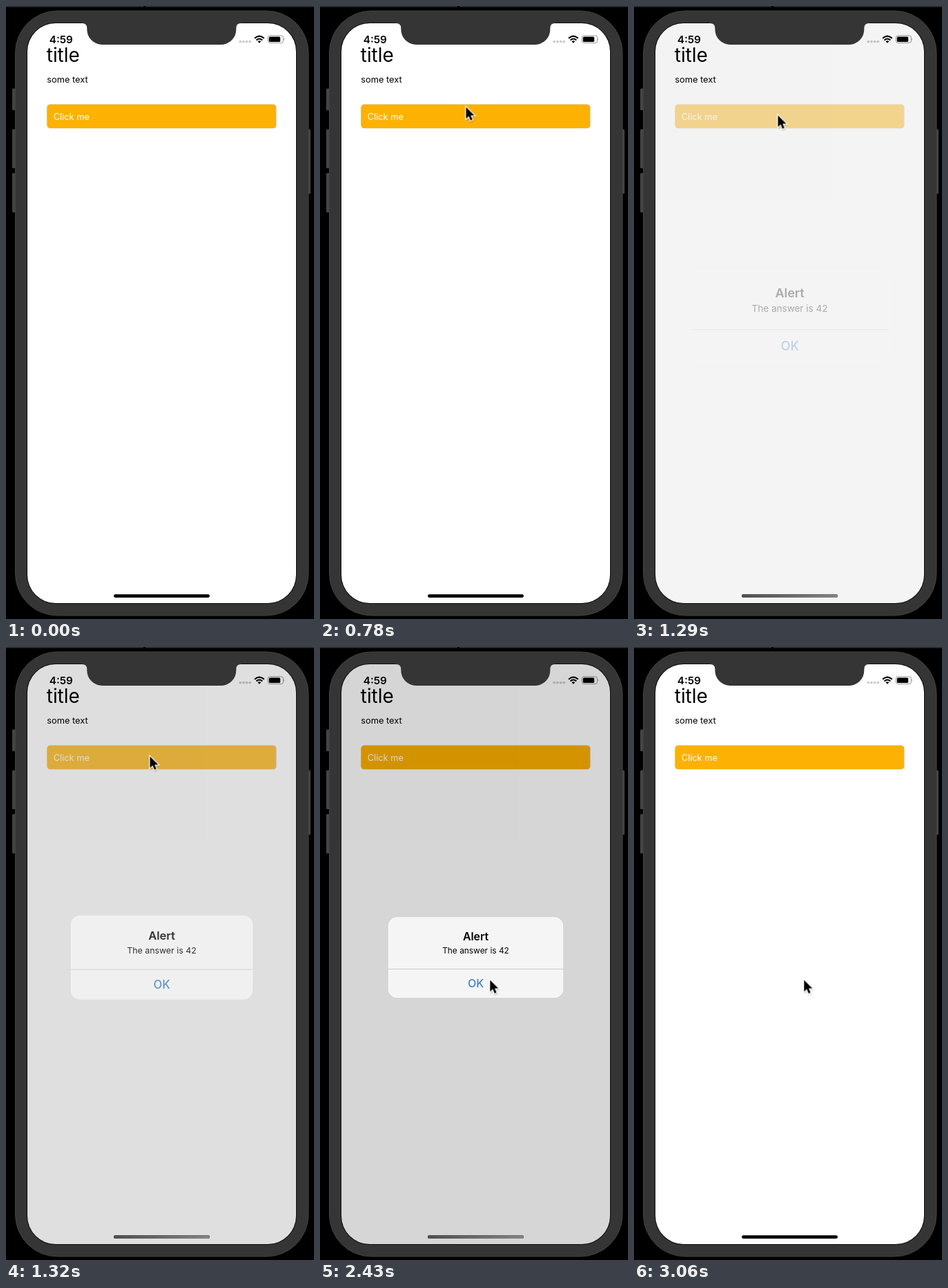
Recreate the animation shown at these times as an HTML page. Size 446 by 888 pixels, loop 3.27 s.

```html
<!DOCTYPE html>
<html lang="en">
<head>
<meta charset="utf-8">
<title>Alert demo</title>
<style>
  html, body { margin: 0; width: 100%; height: 100%; overflow: hidden; background: #000; }
  svg { display: block; width: 100vw; height: 100vh; }
  text { font-family: Inter, Roboto, sans-serif; }
  .bold { font-weight: 600; }
  .center { text-anchor: middle; }

  .anim { animation: 3.27s step-end infinite; }
  #button { animation-name: press; }
  #dim { animation-name: dim; }
  #alert { animation-name: fade; }
  #zoom { animation-name: zoom; transform-origin: 225.5px 449.75px; }
  #highlight { animation-name: highlight; }
  #homeTint { animation-name: homeTint; }
  #cursor { animation-name: move; }

  @keyframes press {
    0% { opacity: 1; }
    24.74% { opacity: 1; animation-timing-function: steps(6); }
    30.25% { opacity: .2; }
    36.67% { opacity: .2; animation-timing-function: steps(2); }
    38.5% { opacity: .3; }
    39.42% { opacity: .42; }
    40.34% { opacity: .74; }
    42.17% { opacity: .96; }
    43.09%, 100% { opacity: 1; }
  }
  @keyframes dim {
    0% { opacity: 0; }
    38.5% { opacity: .016; }
    39.42% { opacity: .047; }
    40.34% { opacity: .126; }
    42.17% { opacity: .155; animation-timing-function: steps(2); }
    44.01% { opacity: .161; }
    77.03% { opacity: .161; animation-timing-function: steps(2); }
    78.87% { opacity: .13; animation-timing-function: steps(4); }
    82.54% { opacity: .045; animation-timing-function: steps(4); }
    86.21% { opacity: .008; animation-timing-function: steps(2); }
    88.04%, 100% { opacity: 0; }
  }
  @keyframes fade {
    0% { opacity: 0; }
    38.5% { opacity: .1; }
    39.42% { opacity: .3; }
    40.34% { opacity: .78; }
    42.17% { opacity: .96; animation-timing-function: steps(2); }
    44.01% { opacity: 1; }
    77.03% { opacity: 1; animation-timing-function: steps(2); }
    78.87% { opacity: .8; animation-timing-function: steps(4); }
    82.54% { opacity: .28; animation-timing-function: steps(4); }
    86.21% { opacity: .05; animation-timing-function: steps(2); }
    88.04%, 100% { opacity: 0; }
  }
  @keyframes zoom {
    0% { transform: scale(1.18); }
    39.42% { transform: scale(1.137); }
    40.34% { transform: scale(1.04); }
    42.17% { transform: scale(1.01); animation-timing-function: steps(4); }
    45.84%, 100% { transform: scale(1); }
  }
  @keyframes highlight {
    0%, 100% { opacity: 0; }
    75.2% { opacity: .07; }
    77.95% { opacity: 0; }
  }
  @keyframes homeTint {
    0%, 100% { opacity: 0; }
    38.5% { opacity: .5; }
    39.42% { opacity: 1; }
    78.87% { opacity: 1; animation-timing-function: steps(8); }
    86.21% { opacity: 0; }
  }
  @keyframes move {
    0% { opacity: 0; transform: translate(221px, 709px); }
    9.15% { opacity: 1; transform: translate(221px, 709px); animation-timing-function: steps(3); }
    11.9% { opacity: 1; transform: translate(222px, 560px); animation-timing-function: steps(3); }
    14.65% { opacity: 1; transform: translate(219px, 360px); animation-timing-function: steps(3); }
    17.4% { opacity: 1; transform: translate(214px, 200px); animation-timing-function: steps(3); }
    20.15% { opacity: 1; transform: translate(211px, 120px); }
    21.07% { opacity: 1; transform: translate(211px, 110px); animation-timing-function: steps(2); }
    22.9% { opacity: 1; transform: translate(212px, 128px); }
    23.82% { opacity: 1; transform: translate(211.5px, 146.5px); }
    24.74% { opacity: 1; transform: translate(208.5px, 158.5px); }
    43.09% { opacity: 1; transform: translate(208.5px, 158.5px); animation-timing-function: steps(3); }
    45.84% { opacity: 1; transform: translate(214px, 215px); animation-timing-function: steps(4); }
    49.51% { opacity: 1; transform: translate(238px, 350px); animation-timing-function: steps(3); }
    52.26% { opacity: 1; transform: translate(253px, 425px); animation-timing-function: steps(3); }
    55.02% { opacity: 1; transform: translate(255.5px, 459px); animation-timing-function: steps(4); }
    58.69% { opacity: 1; transform: translate(251px, 474px); animation-timing-function: steps(5); }
    63.27%, 100% { opacity: 1; transform: translate(246.3px, 482.5px); }
  }
</style>
</head>
<body>
<svg viewBox="0 0 446 888">
  <defs>
    <linearGradient id="homeGrey">
      <stop stop-color="#505050"/>
      <stop offset="1" stop-color="#848484"/>
    </linearGradient>
    <rect id="screen" x="31" y="25" width="389" height="840" rx="41"/>
    <rect id="home" x="156" y="852.3" width="139" height="4.6" rx="2.3"/>
    <path id="arrow" d="M0 0V16.8L3.9 13.1 6.5 19.3 9.3 18.1 6.7 12H12Z"/>
  </defs>

  <rect width="446" height="888"/>
  <path d="M0 .7H199M202 .7H446" stroke="#303030" stroke-width="1.4"/>

  <g fill="#444">
    <rect x="9" y="119.5" width="7" height="31.5" rx="1.5"/>
    <rect x="9" y="178.5" width="7" height="56.5" rx="1.5"/>
    <rect x="9" y="242" width="7" height="57" rx="1.5"/>
    <rect x="434" y="178.5" width="7" height="93.5" rx="1.5"/>
  </g>
  <rect x="13.5" y="7" width="424.5" height="876" rx="61" fill="#353535" stroke="#414141"/>
  <use href="#screen" fill="#fff" stroke="#0c0c0c" stroke-width="2"/>
  <use href="#screen" fill="#fff"/>

  <text x="58.8" y="81" font-size="27.8">title</text>
  <text x="59.3" y="111.3" font-size="12.8">some text</text>
  <g id="button" class="anim">
    <rect x="59.5" y="142.5" width="332" height="34.8" rx="4.5" fill="#d8b779"/>
    <rect x="59.5" y="142.8" width="330.6" height="34" rx="4.5" fill="#fdb102"/>
    <text x="68.7" y="164.6" font-size="12.8" fill="#fff">Click me</text>
  </g>

  <use id="dim" class="anim" href="#screen"/>

  <text class="bold" x="62.8" y="53.5" font-size="15.2">4:59</text>
  <g fill="#000" fill-opacity=".2">
    <circle cx="339.2" cy="51.6" r="1.9"/>
    <circle cx="343.9" cy="51.6" r="1.9"/>
    <circle cx="348.6" cy="51.6" r="1.9"/>
    <circle cx="353.3" cy="51.6" r="1.9"/>
  </g>
  <g fill="none" stroke="#000" stroke-width="2.1">
    <path d="M360 46.8Q366.9 40.4 373.8 46.8"/>
    <path d="M362.5 49.5Q366.9 45.5 371.3 49.5"/>
  </g>
  <path d="M364.5 51.3Q366.9 49.2 369.3 51.3L366.9 53.8Z"/>
  <rect x="379.3" y="42.9" width="22.2" height="10.6" rx="3" fill="none" stroke="#000" stroke-opacity=".4"/>
  <rect x="380.8" y="44.4" width="16.4" height="7.6" rx="1.6"/>
  <path d="M402.6 46.4Q404.4 48.2 402.6 50Z" fill-opacity=".4"/>

  <use href="#home"/>
  <use id="homeTint" class="anim" href="#home" fill="url(#homeGrey)"/>

  <path d="M110 24V25Q117.300 25 117.300 32V34A22 22 0 0 0 139.300 56H311.300A22 22 0 0 0 333.300 34V32Q333.300 25 340.300 25V24Z" fill="#353535"/>

  <g id="alert" class="anim">
    <g id="zoom" class="anim">
      <rect x="99" y="391.5" width="253" height="116.500" rx="12.500" fill="#f5f5f5"/>
      <rect x="99.500" y="392" width="252" height="115.500" rx="12" fill="none" stroke="#fff" stroke-opacity=".6"/>
      <path id="highlight" class="anim" d="M99 467H352V495.500A12.500 12.500 0 0 1 339.500 508H111.500A12.500 12.500 0 0 1 99 495.500Z"/>
      <path d="M99 466.500H352" stroke="#cdcdcd"/>
      <text class="bold center" x="225.500" y="425.200" font-size="15.800">Alert</text>
      <text class="center" x="225.500" y="444" font-size="11.900">The answer is 42</text>
      <text class="center" x="225.700" y="493.200" font-size="16" font-weight="500" fill="#4480ca">OK</text>
    </g>
  </g>

  <g id="cursor" class="anim">
    <use href="#arrow" x=".5" y="1.500" fill-opacity=".12" stroke="#000" stroke-opacity=".12" stroke-width="3.500" stroke-linejoin="round"/>
    <use href="#arrow" fill="#000" stroke="#fff" stroke-width="2.400"/>
    <use href="#arrow"/>
  </g>
</svg>
</body>
</html>
```
